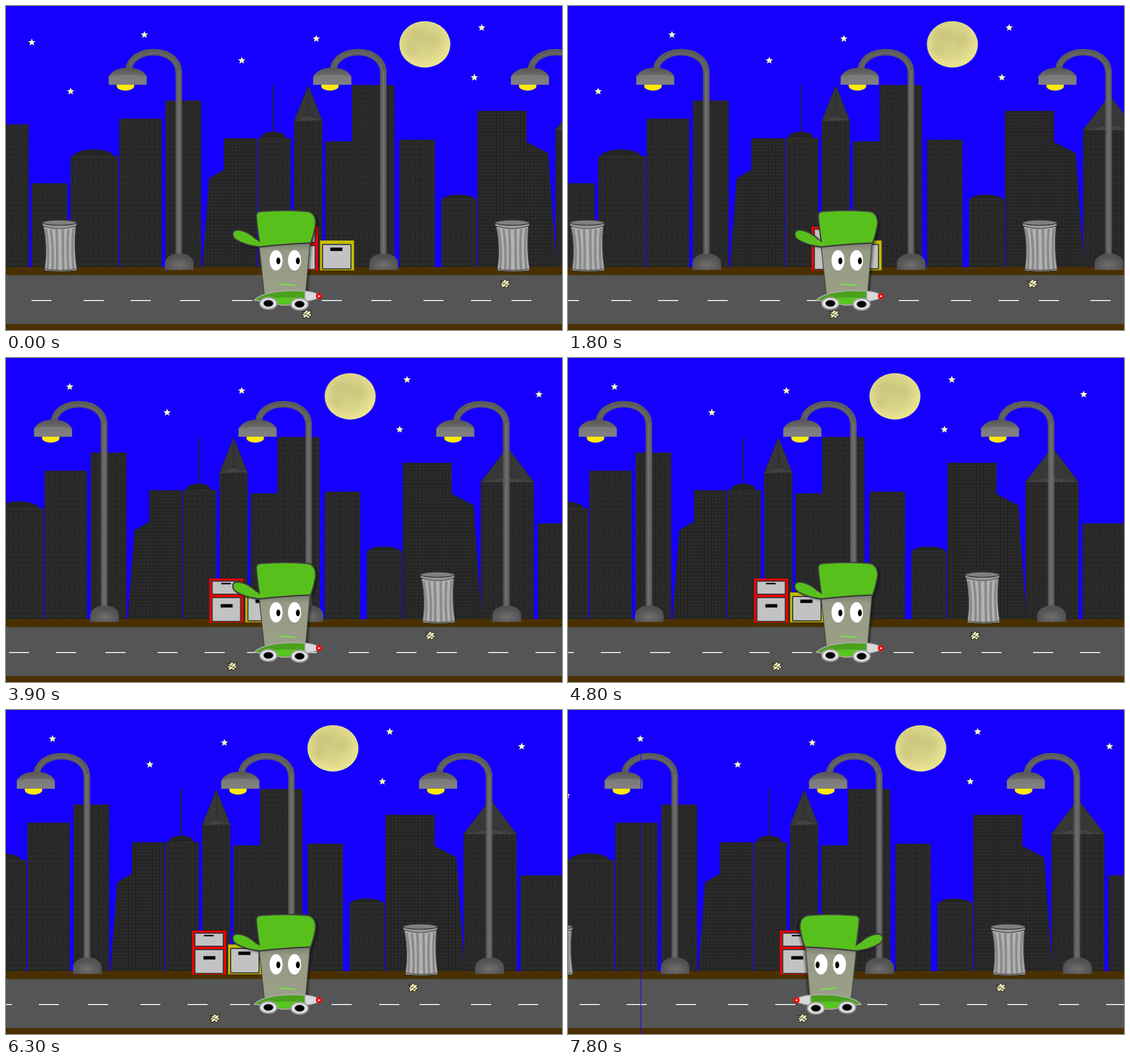
An HTML page for the animation above (8 s loop, 980 by 572 pixels).

```html
<!DOCTYPE html>
<html lang="en">
<head>
<meta charset="utf-8">
<title>Night drive</title>
<style>
html, body { margin: 0; width: 100%; height: 100%; overflow: hidden; background: #1500ff; }
svg { display: block; width: 100vw; height: 100vh; }
#world { animation: scroll 8s infinite; }
#driver { animation: turn 8s step-end infinite; }
#world, #driver { transform-origin: 0 0; }
/* sixteen hops forward, a rest, then hops back */
@keyframes scroll {
  0% { transform: translateX(0); animation-timing-function: steps(16, end); }
  60% { transform: translateX(-162px); animation-timing-function: step-end; }
  86.25% { transform: translateX(-155.5px); animation-timing-function: step-end; }
  90% { transform: translateX(-142.5px); animation-timing-function: step-end; }
  93.75% { transform: translateX(-129.5px); animation-timing-function: step-end; }
  97.5%, 100% { transform: translateX(-116.5px); }
}
@keyframes turn {
  0% { transform: none; }
  82.5%, 100% { transform: translateX(954.5px) scaleX(-1); }
}
</style>
</head>
<body>
<svg viewBox="0 0 980 572" preserveAspectRatio="none">
<defs>
  <pattern id="wide" width="9" height="9" patternUnits="userSpaceOnUse">
    <rect width="9" height="9" fill="#2b2b2b"/>
    <path d="M0 1H9M1 0V9" stroke="#262626" stroke-width="2"/>
  </pattern>
  <pattern id="fine" width="6" height="6" patternUnits="userSpaceOnUse">
    <rect width="6" height="6" fill="#2b2b2b"/>
    <path d="M0 .5H6M.5 0V6" stroke="#1f1f1f"/>
  </pattern>
  <pattern id="slats" width="4" height="4" patternUnits="userSpaceOnUse" patternTransform="rotate(20)">
    <rect width="4" height="4" fill="#3c3c3c"/>
    <path d="M0 .5H4" stroke="#2a2a2a"/>
  </pattern>
  <linearGradient id="pole"><stop offset="0" stop-color="#505050"/><stop offset=".5" stop-color="#707070"/><stop offset="1" stop-color="#555"/></linearGradient>
  <linearGradient id="shade" x2="0" y2="1"><stop offset="0" stop-color="#555"/><stop offset="1" stop-color="#858585"/></linearGradient>
  <radialGradient id="base" cy=".7"><stop offset="0" stop-color="#707070"/><stop offset="1" stop-color="#525252"/></radialGradient>
  <linearGradient id="skin" x2="0" y2="1"><stop offset="0" stop-color="#777a6c"/><stop offset=".18" stop-color="#969b86"/><stop offset="1" stop-color="#9a9f88"/></linearGradient>
  <radialGradient id="moonlight" cx=".45" cy=".4" r=".6"><stop offset="0" stop-color="#d3cd84"/><stop offset=".55" stop-color="#d9d388"/><stop offset="1" stop-color="#ebe592"/></radialGradient>
  <filter id="blur" x="-50%" y="-50%" width="200%" height="200%"><feGaussianBlur stdDeviation="5"/></filter>
  <filter id="shadow"><feDropShadow dx="3" dy="2" stdDeviation="1.5" flood-opacity=".4"/></filter>

  <path id="star" fill="#ffffb4" d="M0-6.5 1.8-2.1 6.4-1.8 2.9 1.2 4 5.8 0 3.3-4 5.8-2.9 1.2-6.4-1.8-1.8-2.1Z"/>

  <g id="lamp">
    <ellipse cx="210.5" cy="141" rx="15.5" ry="8.5" fill="#ffea00"/>
    <path d="M216.5 112C218 93 238 81.5 260 81.5C286 81.5 304.5 96 304.5 118" fill="none" stroke="#5c5c5c" stroke-width="11.5"/>
    <path d="M218 105C223 91 242 83 260 83C282 83 300 95 303 113" fill="none" stroke="#666" stroke-width="3"/>
    <rect x="298.7" y="114" width="11.6" height="326" fill="url(#pole)"/>
    <path d="M181 139V124C188 114 198 109 214 109C231 109 242 114 248 124V139Z" fill="url(#shade)"/>
    <path d="M181 125C190 120 238 120 248 125V139H181Z" fill="#808080" opacity=".7"/>
    <path d="M280 466V453C282 443 292 437 305 437C319 437 329 443 330.5 453V466Z" fill="url(#base)"/>
  </g>

  <g id="can">
    <path d="M66 389Q74 428 68 465Q96 470 125 465Q119 428 123 389Z" fill="#b3b3b3" stroke="#444" stroke-width="1.3"/>
    <g fill="none" stroke="#8a8a8a" stroke-width="4.5">
      <path d="M70 393Q77 428 73 464M79 394Q84 428 82 465M89 394Q91 428 90 466M100 394Q100 428 101 466M110 394Q107 428 110 465M119 392Q115 428 119 464"/>
    </g>
    <path d="M68 464Q96 469 125 464V467Q96 470 68 467Z" fill="#aaa" stroke="#333"/>
    <path d="M64 383V388Q94 398 124.500 388V383Z" fill="#999" stroke="#333" stroke-width="1.2"/>
    <ellipse cx="94.3" cy="382.500" rx="30" ry="4.6" fill="#7e7e7e" stroke="#333" stroke-width="1.3"/>
    <path d="M73 383Q94 379 116 383" fill="none" stroke="#929292" stroke-dasharray="2 1"/>
  </g>

  <g id="paper" stroke="#151500" stroke-linejoin="round">
    <path d="M-8-5-3-4-1-8 3-5 8-6 6-1 9 2 5 4 4 8-1 5-6 8-6 3-9 1-5-1Z" fill="#f5f2c4"/>
    <path d="M-8-5-2 0 3-5M-2 0-6 3M-2 0 3 2 6-1M3 2-1 5M3 2 5 4" fill="none" stroke-width=".8"/>
  </g>

  <g id="wheel">
    <ellipse rx="15" ry="10.3" fill="#e2e2e2" stroke="#a0a0a0" stroke-width="2.3"/>
    <ellipse rx="8.5" ry="5.8" stroke="#555"/>
  </g>
</defs>

<rect width="980" height="572" fill="#1500ff"/>

<g id="world">
  <use href="#star" x="45.500" y="64"/>
  <use href="#star" x="114" y="150.500"/>
  <use href="#star" x="244" y="50.500"/>
  <use href="#star" x="415.500" y="96"/>
  <use href="#star" x="547" y="57.500"/>
  <use href="#star" x="838.500" y="38"/>
  <use href="#star" x="825.500" y="126"/>
  <use href="#star" x="1071" y="64"/>

  <ellipse cx="738.3" cy="67.700" rx="45" ry="41" fill="url(#moonlight)"/>
  <g fill="#c6bf79" opacity=".55" filter="url(#blur)">
    <ellipse cx="724" cy="52" rx="18" ry="11"/>
    <ellipse cx="714" cy="76" rx="10" ry="12"/>
    <ellipse cx="754" cy="61" rx="13" ry="10"/>
  </g>

  <g fill="#242424">
    <path d="M118 266C124 249 184 249 191 266ZM449 234Q450 222 471 222Q492 222 493 234ZM768 342Q774 333 797 333Q822 333 828 342Z"/>
    <path d="M469.800 139H471.800V223H469.800Z"/>
  </g>
  <path fill="url(#wide)" d="M-10 209H40V461H-10ZM45 313H108V461H45ZM114 265H197.500V461H114ZM199.500 199H274.500V461H199.500ZM281 167H344V461H281ZM443.500 233H502V461H443.500ZM508 202H557.500V461H508ZM563 239H611V461H563ZM610 139.500H684.500V461H610ZM693.500 236H756V461H693.500ZM767.500 341H829.500V461H767.500ZM968.500 218H1062V461H968.500ZM1069 292H1160V461H1069Z"/>
  <path fill="url(#fine)" d="M346 461 358 304 384 289V233.500H442V461ZM831 185H917.500V240L956 260 970 461H831Z"/>
  <path d="M450 233.500H492M769 341H827M118 265H190" stroke="#3b3b3b" stroke-dasharray="9 2"/>
  <g fill="url(#slats)" stroke="#2c2c2c">
    <path d="M533 141 508 203 533 191 557 202ZM1015.500 158 968.500 219 1015.500 207 1062 219Z"/>
    <path d="M533 141V191M1015.500 158V207" stroke="#252525"/>
  </g>
  <path d="M508 203 533 191 557 202ZM968.500 219 1015.500 207 1062 219Z" fill="#454545"/>
  <path d="M533 191 515 202M533 191 524 202M533 191V202M533 191 542 202M533 191 550 202M1015.500 207 983 218M1015.500 207 1001 218M1015.500 207V218M1015.500 207 1030 218M1015.500 207 1047 218" stroke="#2c2c2c"/>

  <rect x="-10" y="461" width="1180" height="14" fill="#4a3000"/>
  <rect x="-10" y="475" width="1180" height="87" fill="#555"/>
  <rect x="-10" y="561.500" width="1180" height="11" fill="#4a3000"/>
  <path d="M45 520h35m57 0h35m48 0h35m52 0h35m57 0h35m48 0h35m40 0h35m52 0h35m57 0h35m49 0h35m36 0h35m56 0h35m48 0h35" stroke="#fff" stroke-width="2" stroke-dasharray="2.500 .5"/>

  <use href="#lamp"/>
  <use href="#lamp" x="360.500"/>
  <use href="#lamp" x="709"/>
  <use href="#can"/>
  <use href="#can" x="798"/>

  <rect x="490" y="389.500" width="60" height="77.500" fill="#f00000"/>
  <rect x="553.500" y="414" width="60" height="52.500" fill="#c4bd00"/>
  <g fill="#c2c2c2" stroke="#3c3c3c" stroke-width="2">
    <rect x="495" y="394" width="50" height="23"/>
    <rect x="495" y="423" width="50" height="42"/>
    <rect x="558" y="421" width="50" height="43" rx="1"/>
  </g>
  <path d="M511 397H528V399.500H511ZM510 434.500H531V440.500H510ZM571.500 426.500H593V432.500H571.500Z"/>

  <use href="#paper" x="530" y="544"/>
  <use href="#paper" x="879.500" y="490"/>
</g>

<g id="driver" stroke-linejoin="round">
  <g filter="url(#shadow)">
    <path d="M446 421 536 417 528 508H455Z" fill="url(#skin)" stroke="#444" stroke-width="1.500"/>
    <g fill="#58c01e" stroke="#3b3b3b" stroke-width="2.300">
      <path d="M441 370Q441 363 450 362.500C477 360.500 507 360.500 531 362.500C543 364 547 375 545.500 387C543 400 541 409 537 418.500Q493 420 446 425.500Q447 416 445 406C443 393 442 383 441 370Z"/>
      <path d="M447 417C432 403 420 395 407 395.500C398 396 397 407 406 413C419 421 434 424 447 425.500"/>
    </g>
  </g>
  <path d="M441.500 412 448 418V424L441 422Z" fill="#58c01e"/>
  <g fill="#fff">
    <ellipse cx="476" cy="449" rx="11.500" ry="18"/>
    <ellipse cx="508.500" cy="449" rx="11.500" ry="18"/>
  </g>
  <ellipse cx="480" cy="450" rx="3.500" ry="6"/>
  <ellipse cx="514.500" cy="450" rx="3.500" ry="6"/>
  <path d="M481.500 491 508.500 493.300" stroke="#74f32d" stroke-width="1.800"/>
  <path d="M437.500 519.500C453 505 490 500 527 503.500V521C516 525 502 529 487 528C470 524 455 521 437.500 519.500Z" fill="#4aa21c" stroke="#aaa" stroke-width="2"/>
  <path d="M447 519C469 513 499 516 526 515V521C514 524 503 527 487 527C470 524 458 521 447 519Z" fill="#58c420"/>
  <path d="M527 503.500Q541 504 549 509V516Q541 520 527 521Z" fill="#d8d8d8" stroke="#aaa" stroke-width="1.500"/>
  <circle cx="551.500" cy="512.300" r="5.300" fill="#f50000"/>
  <circle cx="551.500" cy="512.300" r="1.600" fill="#fff"/>
  <use href="#wheel" x="462.500" y="525"/>
  <use href="#wheel" x="517.500" y="526.500"/>
</g>
</svg>
</body>
</html>
```
